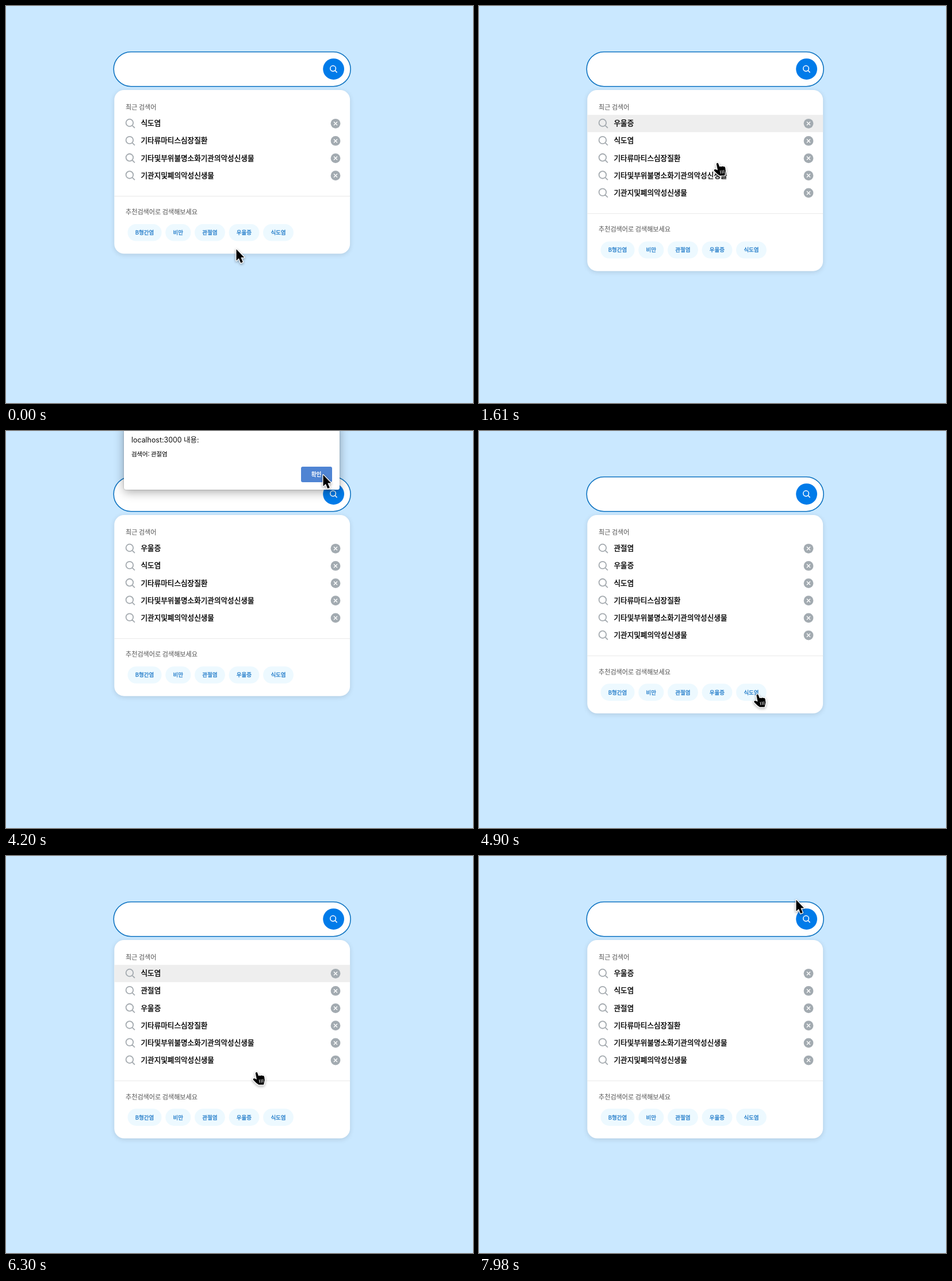
Write an HTML page with a canvas that moves like this. It is 812 by 690 pixels and loops after 8000 ms.

```html
<!DOCTYPE html>
<html lang="ko">
<head>
<meta charset="utf-8">
<style>
html, body { margin: 0; width: 812px; height: 690px; overflow: hidden; background: #cae8ff; }
canvas { display: block; }
</style>
</head>
<body>
<canvas id="stage" width="812" height="690"></canvas>
<script>
const ctx = document.getElementById('stage').getContext('2d');
const LOOP = 8000, STEP = 70, ROW = 30.15;
const TO_CHIP = 630, TO_BUTTON = 420, FADE = 140;
const REST = [400, 421.5], CONFIRM = [551, 75];
const KOREAN = '"Noto Sans CJK KR", "Noto Sans CJK", sans-serif';

const recent = ['식도염', '기타류마티스심장질환', '기타및부위불명소화기관의악성신생물', '기관지및폐의악성신생물'];
const chips = ['B형간염', '비만', '관절염', '우울증', '식도염'];
// x is where the chip gets clicked
const alerts = [
  { word: '우울증', x: 414, open: 490, close: 1330 },
  { word: '관절염', x: 348, open: 2170, close: 4270 },
  { word: '식도염', x: 484, open: 5180, close: 5880 },
  { word: '우울증', x: 419, open: 6930, close: 7840 }
];

const arrow = new Path2D('M.5 1.3V21L4.9 16.9L8.2 25.1L11.8 23.5L8.4 15.5H14.2Z');
const hand = new Path2D('M-1.6 1.8Q-1 -.4 .8 .2Q1.7 .6 2 1.9L3.8 6.8Q5.5 5.2 7 6.6Q9 5 10.4 6.4Q13 5.6 13.8 8.6L14.4 14L12.6 22H4L-.2 19L-5.6 13.4Q-6 10.8 -3.2 11L.6 12.8Z');
const fingers = new Path2D('M5 13L6 18.6M8.2 12.6L9 18.4M11.2 12.2L11.6 18');

const wordsAt = t => alerts.filter(a => t >= a.close + STEP)
  .reduce((list, { word }) => [word, ...list.filter(w => w !== word)], recent);
const growth = words => (words.length - recent.length) * ROW;

// The pointer goes to a chip, then to the confirm button, once per alert
const legs = alerts.flatMap(({ x, open, close }, i) => {
  const start = i ? alerts[i - 1].close : 0, click = open - STEP;
  const chip = [x, 397.5 + growth(wordsAt(click))];
  return [
    { start, end: Math.min(start + TO_CHIP, click), to: chip, until: click },
    { start: click, end: click + TO_BUTTON, to: CONFIRM, until: close }
  ];
});

function pointerAt(t) {
  const i = legs.findLastIndex(leg => leg.start <= t);
  const { start, end, to, until } = legs[i];
  const from = i ? legs[i - 1].to : REST;
  const left = 1 - Math.min(1, (t - start) / (end - start));
  const x = to[0] + (from[0] - to[0]) * left ** 1.9;
  const y = to[1] + (from[1] - to[1]) * left ** 1.4;
  // Halfway through a long wait the pointer swings up and down once
  const swing = (t - (end + until) / 2) / TO_BUTTON;
  const idle = until - end > 1000 && Math.abs(swing) < 0.5;
  return [x, idle ? y + 40 * Math.sin(swing * 2 * Math.PI) : y];
}

function box(x, y, w, h, r, fill) {
  ctx.beginPath();
  ctx.roundRect(x, y, w, h, r);
  ctx.fillStyle = fill;
  ctx.fill();
}

function disc(x, y, r, fill) {
  ctx.beginPath();
  ctx.arc(x, y, r, 0, 7);
  ctx.fillStyle = fill;
  ctx.fill();
}

function shadow(color, blur = 0, y = 0) {
  ctx.shadowColor = color;
  ctx.shadowBlur = blur;
  ctx.shadowOffsetY = y;
}

function text(str, x, y, size, color, { weight = 400, swell = 0, family = KOREAN } = {}) {
  ctx.font = `${weight} ${size}px ${family}`;
  ctx.fillStyle = ctx.strokeStyle = color;
  ctx.fillText(str, x, y);
  if (swell) {
    ctx.lineWidth = swell;
    ctx.strokeText(str, x, y);
  }
}

function lens(x, y, r, tail, color, width) {
  const d = r * Math.SQRT1_2;
  ctx.beginPath();
  ctx.arc(x, y, r, 0, 7);
  ctx.moveTo(x + d, y + d);
  ctx.lineTo(x + tail, y + tail);
  ctx.strokeStyle = color;
  ctx.lineWidth = width;
  ctx.stroke();
}

function cross(x, y, r) {
  ctx.beginPath();
  for (const s of [-r, r]) {
    ctx.moveTo(x - r, y - s);
    ctx.lineTo(x + r, y + s);
  }
  ctx.strokeStyle = '#fff';
  ctx.lineWidth = 1.4;
  ctx.stroke();
}

function searchBar() {
  box(187.2, 79.7, 411.9, 60, 30, '#fff');
  ctx.strokeStyle = '#1074c2';
  ctx.lineWidth = 1.6;
  ctx.stroke();
  disc(569.6, 109.6, 18.4, '#007be9');
  lens(568.6, 108.6, 4.8, 7, '#fff', 1.5);
}

function panel(words, hover) {
  const down = growth(words);
  shadow('rgba(0,0,0,.12)', 8, 2);
  box(188.3, 146, 409.8, 284.5 + down, 17, '#fff');
  shadow('transparent');
  text('최근 검색어', 208, 180.4, 11.1, '#666', { swell: 0.15 });
  if (hover) box(188.3, 189.3, 409.8, 30, 0, '#eee');
  words.forEach((word, i) => {
    const y = 204.3 + i * ROW;
    lens(214.9, y - 1.3, 6.3, 9, '#a5abb0', 1.8);
    text(word, 234.5, y + 4, 12.6, '#000', { swell: 0.4 });
    disc(573, y, 8.4, '#a3abb1');
    cross(573, y, 3);
  });
  box(188.3, 330 + down, 409.8, 1, 0, '#e8e8e8');
  text('추천검색어로 검색해보세요', 208, 362.3 + down, 11.1, '#666', { swell: 0.15 });
  chipRow(down);
}

function chipRow(down) {
  const size = 9.5, pad = 13.3, gap = 6.7;
  let x = 211.5;
  for (const word of chips) {
    ctx.font = `${size}px ${KOREAN}`;
    const w = ctx.measureText(word).width + 2 * pad;
    box(x, 379 + down, w, 29.6, 14.8, '#edf9ff');
    text(word, x + pad, 397.2 + down, size, '#2a80cb', { swell: 0.35 });
    x += w + gap;
  }
}

function dialog({ word, open, close }, t, [x, y]) {
  const alpha = Math.min(1, (t - open + STEP) / (FADE + STEP), (close + FADE - t) / (FADE + STEP));
  if (alpha <= 0) return;
  ctx.globalAlpha = alpha;
  shadow('rgba(0,0,0,.34)', 17, 4);
  box(205, -12, 375, 114, 4, '#fff');
  shadow('rgba(0,0,0,.35)', 2);
  box(205, -12, 375, 114, 4, '#fff');
  shadow('transparent');
  text('localhost:3000 내용:', 218, 20, 12.4, '#111', { family: 'Inter, ' + KOREAN });
  text('검색어: ' + word, 218, 44, 10.4, '#111', { swell: 0.15 });
  const over = x > 513 && x < 567 && y > 62 && y < 89;
  const pressed = t >= close - FADE;
  box(513, 62, 54, 27, 3, pressed ? '#4f84d3' : over ? '#2c78e3' : '#1a73e8');
  text('확인', 530.7, 78.8, 9.7, '#fff', { weight: 700 });
  ctx.globalAlpha = 1;
}

function pointer(x, y, isHand) {
  const shape = isHand ? hand : arrow;
  ctx.save();
  ctx.translate(x, y);
  ctx.lineWidth = 2.6;
  ctx.strokeStyle = '#fff';
  shadow('rgba(0,0,0,.4)', 4, 1.5);
  ctx.stroke(shape);
  shadow('transparent');
  ctx.fillStyle = '#000';
  ctx.fill(shape);
  if (isHand) {
    ctx.lineWidth = 1;
    ctx.stroke(fingers);
  }
  ctx.restore();
}

function draw(now) {
  const t = Math.floor(now % LOOP / STEP) * STEP;
  const words = wordsAt(t), down = growth(words);
  const tip = pointerAt(t);
  const blocked = alerts.some(a => t >= a.open && t < a.close + FADE);
  const isHand = !blocked && tip[1] > 190 && tip[1] < 408 + down;
  box(0, 0, 812, 690, 0, '#cae8ff');
  searchBar();
  // The first row stays lit until the pointer has left the list
  panel(words, isHand && tip[1] < 330 + down);
  alerts.forEach(a => dialog(a, t, tip));
  pointer(...tip, isHand);
}

const start = performance.now();
function tick() {
  draw(performance.now() - start);
  requestAnimationFrame(tick);
}
ctx.lineJoin = 'round';
tick();
</script>
</body>
</html>
```
